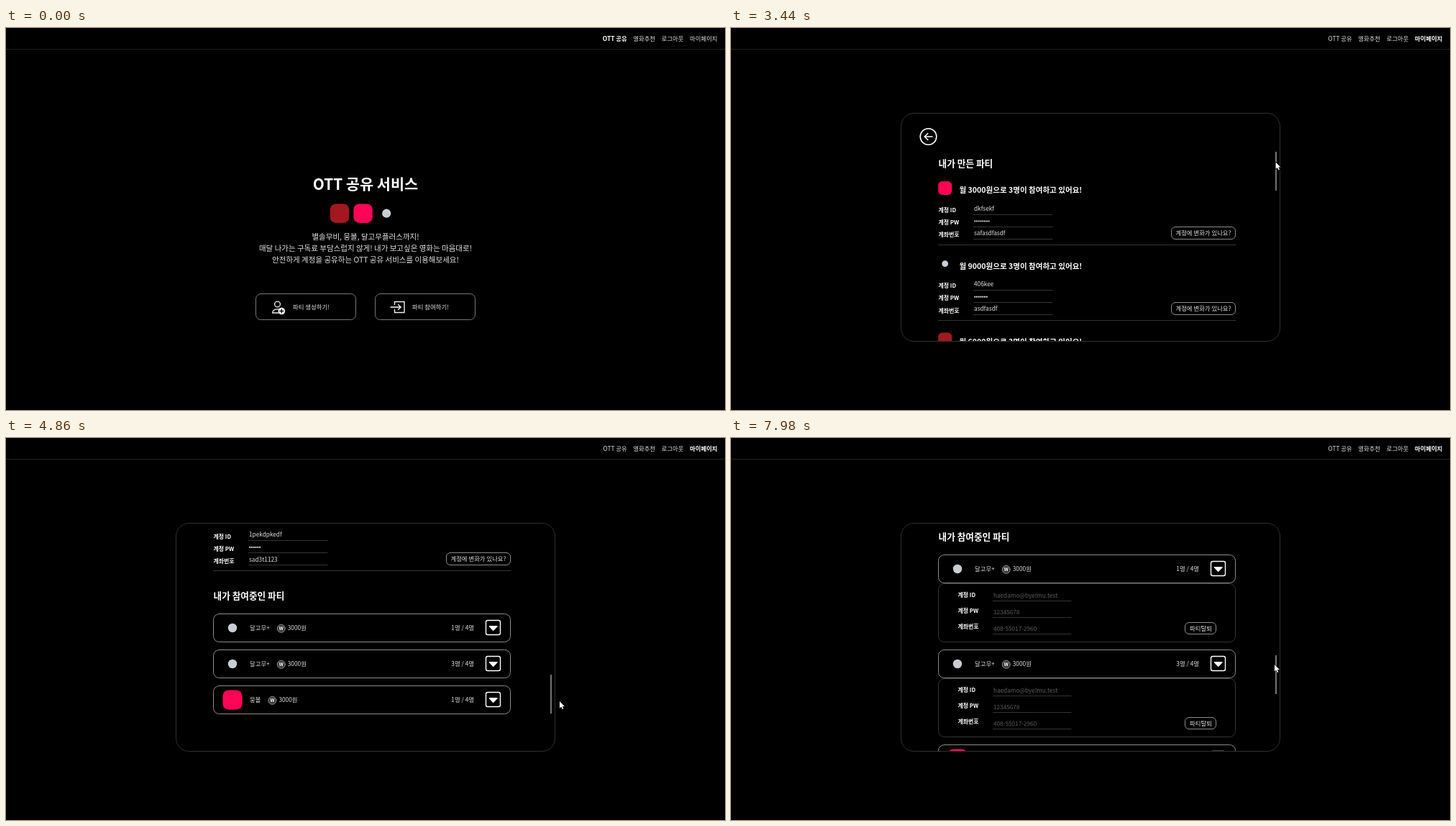
Animation of 1000 by 531 pixels, one loop 8000 ms. Source, as an HTML page with a canvas:

```html
<!DOCTYPE html>
<html lang="ko">
<head>
<meta charset="utf-8">
<title>OTT 공유 서비스</title>
<style>
html, body { margin: 0; width: 100%; height: 100%; overflow: hidden; background: #000; }
canvas { display: block; }
</style>
</head>
<body>
<canvas id="stage" width="1000" height="531"></canvas>
<script>
const ctx = document.getElementById('stage').getContext('2d');
const LOOP = 8000;
const FONT = '"Noto Sans CJK KR", "Noto Sans CJK JP", sans-serif';
const LOGOS = { pink: '#ff0558', red: '#a3181f', pale: '#c9ced3' };
const SOFT = '#e2e2e2', EDGE = '#8c8c8c', DIM = '#343434';
const PAGE_AT = 2120, OPEN = [5420, 7300, Infinity];
const DETAIL_H = 82, THUMB_STEP = 27;

// Each move eases the pointer to x, y between two times
const MOVES = [
  { from: 1220, to: 1610, x: 971, y: 20 },
  { from: 2120, to: 2840, x: 757.5, y: 184 },
  { from: 3370, to: 4050, x: 760.5, y: 264.5 },
  { from: 4160, to: 4430, x: 770, y: 366 },
  { from: 4860, to: 5400, x: 677, y: 263 },
  { from: 5750, to: 6060, x: 757, y: 315 },
  { from: 6200, to: 6500, x: 757, y: 343 },
  { from: 6500, to: 6850, x: 689, y: 324.5 },
  { from: 7060, to: 7250, x: 677, y: 313 },
  { from: 7580, to: 7960, x: 756, y: 315 }
];
const DRAGS = [MOVES[2], MOVES[3], MOVES[6]];

const MADE = [
  { logo: 'pink', price: 3000, id: 'dkfsekf', dots: 8, no: 'safasdfasdf' },
  { logo: 'pale', price: 9000, id: '406kee', dots: 7, no: 'asdfasdf' },
  { logo: 'red', price: 6000, id: '1pekdpkedf', dots: 6, no: 'sad3t1123' }
];
const JOINED = [
  { logo: 'pale', name: '달고무+', count: 1 },
  { logo: 'pale', name: '달고무+', count: 3 },
  { logo: 'pink', name: '뭉볼', count: 1 }
];
const LABELS = ['계정 ID', '계정 PW', '계좌번호'];

function ease(t, { from, to }) {
  const p = Math.min(1, Math.max(0, (t - from) / (to - from)));
  return p * p * (3 - 2 * p);
}

function pointer(t) {
  let x = 985, y = -14;
  for (const move of MOVES) {
    const p = ease(t, move);
    x += (move.x - x) * p;
    y += (move.y - y) * p;
  }
  return { x, y };
}

function scrollState(t) {
  const [a, b, c] = DRAGS.map(drag => ease(t, drag));
  const opened = OPEN.filter(at => t >= at).length;
  return {
    scroll: 152 * a + 180 * b + DETAIL_H * c,
    thumb: 170 + 67 * a + 92 * b + THUMB_STEP * (c - opened)
  };
}

const snap = v => Math.floor(v) + 0.5;

function setFont(size, weight) {
  ctx.font = `${weight} ${size}px ${FONT}`;
}

// y is the middle of the Hangul glyphs
function text(str, x, y, size, color = '#fff', weight = 400, align = 'left') {
  setFont(size, weight);
  ctx.textAlign = align;
  ctx.fillStyle = color;
  ctx.fillText(str, x, y + size * 0.37);
}

function stroke(color, width = 1) {
  ctx.strokeStyle = color;
  ctx.lineWidth = width;
  ctx.stroke();
}

function fill(color) {
  ctx.fillStyle = color;
  ctx.fill();
}

function box(x, y, w, h, r, color, width) {
  ctx.beginPath();
  ctx.roundRect(snap(x), snap(y), w, h, r);
  stroke(color, width);
}

function path(points) {
  ctx.beginPath();
  points.forEach(([x, y]) => ctx.lineTo(x, y));
}

function line(points, color, width) {
  path(points);
  stroke(color, width);
}

function rule(x1, x2, y, color) {
  line([[x1, snap(y)], [x2, snap(y)]], color);
}

function circle(x, y, r) {
  ctx.beginPath();
  ctx.arc(x, y, r, 0, 2 * Math.PI);
}

function logo(kind, x, y, size) {
  if (kind === 'pale') {
    circle(x, y, size * 0.23);
  } else {
    ctx.beginPath();
    ctx.roundRect(x - size / 2, y - size / 2, size, size, size * 0.3);
  }
  fill(LOGOS[kind]);
}

// arrow of the given length whose head ends at x
function arrow(x, y, length, head, width) {
  const back = Math.sign(length) * head;
  line([[x - length, y], [x, y]], '#fff', width);
  line([[x - back, y - head], [x, y], [x - back, y + head]], '#fff', width);
}

function drawNav(active, hover) {
  let right = 989.5;
  ['마이페이지', '로그아웃', '영화추천', 'OTT 공유'].forEach((label, i) => {
    const color = hover && i === 0 ? '#c4c4c4' : i === active ? '#fff' : SOFT;
    text(label, right, 15, 8.35, color, i === active ? 700 : 400, 'right');
    right -= ctx.measureText(label).width + 8.7;
  });
  rule(0, 1000, 29, '#222');
}

function drawHome() {
  text('OTT 공유 서비스', 500, 217, 20.8, '#fff', 600, 'center');
  ['red', 'pink', 'pale'].forEach((kind, i) => logo(kind, 464 + i * 32.6, 257.7, 26.5));
  ['별솔무비, 뭉볼, 달고무플러스까지!',
    '매달 나가는 구독료 부담스럽지 않게! 내가 보고싶은 영화는 마음대로!',
    '안전하게 계정을 공유하는 OTT 공유 서비스를 이용해보세요!'
  ].forEach((s, i) => text(s, 500, 290.5 + i * 16, 10.5, SOFT, 400, 'center'));

  ['파티 생성하기!', '파티 참여하기!'].forEach((label, i) => {
    box(347 + i * 166, 369, 139, 36, 7, '#777');
    text(label, 399 + i * 166, 388, 8.4, SOFT);
  });

  // add person
  circle(377.5, 384, 3.9);
  stroke('#eee', 1.3);
  ctx.beginPath();
  ctx.moveTo(379, 396);
  ctx.lineTo(370.5, 396);
  ctx.quadraticCurveTo(371, 390.5, 379, 390.8);
  stroke('#eee', 1.3);
  circle(383.3, 393.5, 4.8);
  fill('#fff');
  line([[380.8, 393.5], [385.8, 393.5]], '#000', 1.3);
  line([[383.3, 391], [383.3, 396]], '#000', 1.3);

  // enter
  line([[540.5, 384.5], [540.5, 380.5], [554, 380.5], [554, 395.5], [540.5, 395.5], [540.5, 391.5]], '#eee', 1.4);
  arrow(549, 388, 14, 3.5, 1.3);
}

function button(label, x, y, w, h) {
  box(x, y, w, h, 5.5, EDGE);
  text(label, x + w / 2 + 0.5, snap(y) + h / 2, 8.4, SOFT, 400, 'center');
}

function drawMade(party, y) {
  logo(party.logo, 297.7, y - 3, 19);
  text(`월 ${party.price}원으로 3명이 참여하고 있어요!`, 317.5, y, 10.55, '#fff', 700);
  LABELS.forEach((label, i) => {
    const ly = y + 27.7 + i * 17.1;
    text(label, 288.5, ly, 7.9, '#fff', 700);
    rule(337, 447, ly + 5.8, DIM);
    if (i !== 1) text(i ? party.no : party.id, 338, ly - 2.3, 8.25, SOFT);
  });
  for (let i = 0; i < party.dots; i++) {
    circle(339.3 + i * 2.75, y + 43, 1.1);
    fill(SOFT);
  }
  button('계정에 변화가 있나요?', 612, y + 50.5, 89, 17);
  rule(288, 702, y + 76, DIM);
}

function drawRow(party, y) {
  const mid = y + 20;
  box(288, y, 413, 39, 8, EDGE);
  logo(party.logo, 315, mid, 27);
  text(party.name, 339, mid + 0.3, 8.4, SOFT);
  const coin = 355 + ctx.measureText(party.name).width;
  circle(coin, mid + 0.8, 5.5);
  fill('#383838');
  stroke('#aaa', 0.8);
  text('W', coin, mid + 0.8, 6.5, '#fff', 700, 'center');
  text('3000원', coin + 9, mid + 0.3, 8.3, SOFT);
  text(`${party.count}명 / 4명`, 651, mid + 0.3, 8.4, SOFT, 400, 'right');
  box(667, mid - 10.5, 20, 20, 2.5, '#fff', 1.4);
  path([[672.5, mid - 2.3], [683, mid - 2.3], [677.7, mid + 3.3]]);
  ctx.closePath();
  fill('#fff');
  stroke('#fff', 1.4);
}

function drawDetail(y) {
  const values = ['haedamo@byelmu.test', '12345678', '408-55017-2960'];
  box(288, y, 413, DETAIL_H - 1, 8, DIM);
  LABELS.forEach((label, i) => {
    const low = y + 17 + i * 22.9;
    text(label, 315.5, y + 16.3 + i * 22, 7.9, '#fff', 700);
    text(values[i], 365, low, 8.2, '#5c5c5c');
    rule(364, 473, low + 7.2, DIM);
  });
  button('파티탈퇴', 631.5, y + 54.5, 43, 16);
}

function drawParties(t) {
  const { scroll, thumb } = scrollState(t);
  ctx.save();
  ctx.beginPath();
  ctx.roundRect(237, 118.5, 526, 316.5, 18);
  ctx.clip();
  ctx.translate(0, -Math.round(scroll));

  circle(274.5, 156, 11.3);
  stroke('#fff', 1.6);
  arrow(269.3, 156, -10.7, 4.5, 1.5);
  text('내가 만든 파티', 288.5, 193, 12.7, '#fff', 700);
  MADE.forEach((party, i) => drawMade(party, 230.5 + i * 105.2));

  text('내가 참여중인 파티', 288.5, 551, 12.65, '#fff', 700);
  let y = 576;
  JOINED.forEach((party, i) => {
    drawRow(party, y);
    if (t >= OPEN[i]) {
      drawDetail(y + 40);
      y += DETAIL_H;
    }
    y += 50;
  });
  ctx.restore();

  box(236, 118, 527, 317, 18, '#303030');
  ctx.fillStyle = '#747474';
  ctx.fillRect(757, thumb, 2, 54);
}

function drawArrowCursor() {
  path([[0, 0], [0, 9.6], [2.2, 7.6], [3.8, 11], [5.3, 10.3], [3.8, 7.1], [6.8, 7]]);
  ctx.closePath();
}

function drawHandCursor() {
  ctx.beginPath();
  ctx.roundRect(-1.1, 0, 2.3, 8, 1.1);
  ctx.roundRect(-3.2, 4.6, 8.8, 7.4, 3);
}

function drawCursor({ x, y }, hand) {
  ctx.save();
  ctx.translate(x, y);
  if (hand) drawHandCursor();
  else drawArrowCursor();
  stroke('#000', 1.4);
  fill('#fff');
  ctx.restore();
}

function draw(t) {
  const at = pointer(t);
  const onPage = t >= PAGE_AT;
  const hover = at.x > 948 && at.y > 8 && at.y < 28;
  ctx.fillStyle = '#000';
  ctx.fillRect(0, 0, 1000, 531);
  ctx.lineJoin = ctx.lineCap = 'round';
  drawNav(onPage ? 0 : 3, hover);
  if (onPage) drawParties(t);
  else drawHome();
  drawCursor(at, hover);
}

const start = performance.now();
function tick() {
  draw((performance.now() - start) % LOOP);
  requestAnimationFrame(tick);
}
tick();
</script>
</body>
</html>
```
